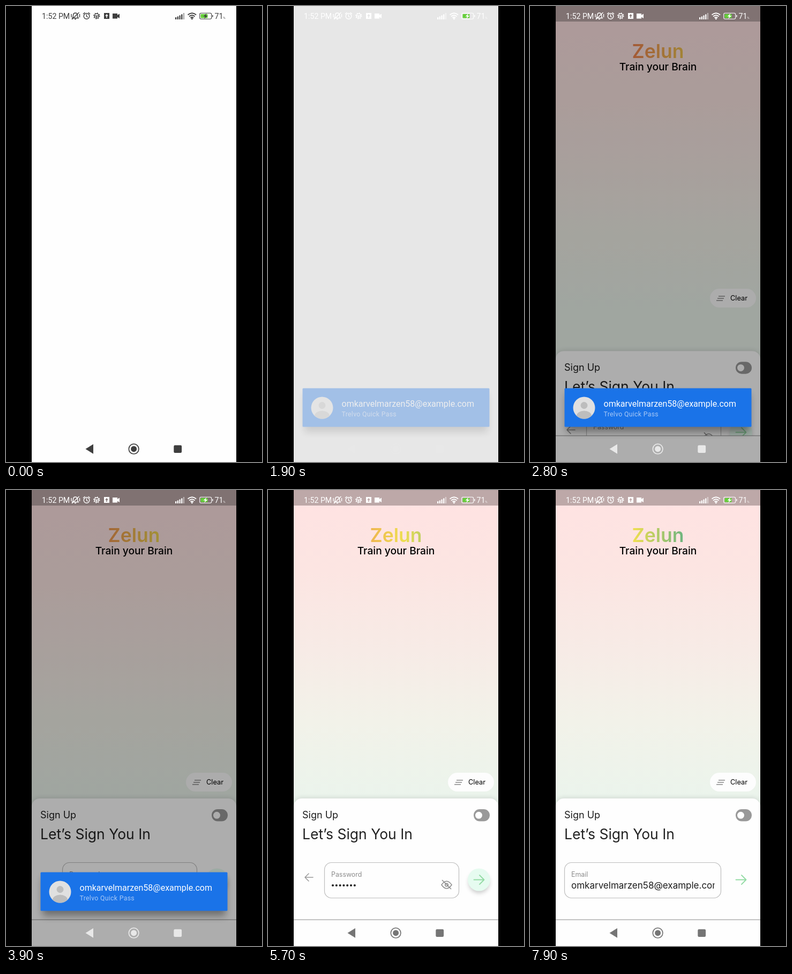
Animation of 478x850 px, one loop 8 s. Source, as an HTML page:

```html
<!DOCTYPE html>
<html lang="en">
<head>
<meta charset="utf-8">
<title>Sign in</title>
<style>
html, body { margin: 0; width: 100%; height: 100%; overflow: hidden; background: #000; }
svg { display: block; width: 100vw; height: 100vh; }
text { font-family: Inter, sans-serif; }
.sys { font-family: Roboto, sans-serif; }
.line { fill: none; stroke: currentColor; }
.round { stroke-linecap: round; stroke-linejoin: round; }
</style>
</head>
<body>
<svg viewBox="0 0 478 850">
  <defs>
    <linearGradient id="sky" gradientUnits="userSpaceOnUse" x1="0" y1="0" x2="0" y2="575">
      <stop offset="0" stop-color="#ffe2e2"/>
      <stop offset=".26" stop-color="#fce5e2"/>
      <stop offset=".52" stop-color="#f7ebe6"/>
      <stop offset=".75" stop-color="#f2f2e9"/>
      <stop offset="1" stop-color="#ebf4ec"/>
    </linearGradient>
    <linearGradient id="shimmer" gradientUnits="userSpaceOnUse" x1="0" x2="400" y1="0" y2="0">
      <stop offset="0" stop-color="#f16b50"/>
      <stop offset=".45" stop-color="#eede50"/>
      <stop offset=".725" stop-color="#55ad88"/>
      <stop offset="1" stop-color="#4a90d9"/>
    </linearGradient>
    <filter id="blur" x="-20%" y="-60%" width="140%" height="220%"><feGaussianBlur stdDeviation="7"/></filter>
    <filter id="soft" x="-50%" y="-50%" width="200%" height="200%"><feGaussianBlur stdDeviation="4"/></filter>
    <clipPath id="screen"><rect x="48" width="382" height="850"/></clipPath>
    <clipPath id="avatar"><circle cx="101" cy="749" r="20.5"/></clipPath>
    <clipPath id="entry"><rect x="70" y="722" width="275" height="34"/></clipPath>
  </defs>

  <rect width="478" height="850"/>
  <g clip-path="url(#screen)">
    <rect x="48" width="382" height="850" fill="#fefefe"/>

    <g id="page">
      <rect x="48" width="382" height="801" fill="url(#sky)"/>
      <rect x="48" width="382" height="29" opacity=".26"/>
      <text x="239" y="97" font-size="35.5" font-weight="600" text-anchor="middle" fill="url(#shimmer)">Zelun</text>
      <text x="239" y="120" font-size="19.2" font-weight="500" text-anchor="middle">Train your Brain</text>

      <rect x="336" y="527" width="86" height="35" rx="17.5" fill="#fdfdfd"/>
      <path class="line" color="#888" stroke-width="1.6" d="M352 541h12M350 545h12M348 549h12"/>
      <text x="374" y="549" font-size="12.8">Clear</text>

      <g id="sheet">
        <rect x="48" y="573" width="382" height="60" rx="15" opacity=".1" filter="url(#soft)"/>
        <rect x="48" y="575" width="382" height="290" rx="15" fill="#fefefe"/>
        <text x="64" y="611.5" font-size="18" fill="#1c1c1c">Sign Up</text>
        <text x="64" y="651" font-size="26.5" fill="#222">Let’s Sign You In</text>
        <rect x="384" y="595" width="30" height="22.5" rx="11.2" fill="#999"/>
        <circle cx="393.5" cy="606.3" r="6.5" fill="#fff"/>

        <rect id="field" y="694.5" height="66" rx="13" fill="none" stroke="#bcbcbc" stroke-width="1.2"/>
        <g id="secret">
          <path class="line round" color="#999" stroke-width="1.5" d="M84 722H69m7-7l-7 7l7 7"/>
          <text x="118" y="720.5" font-size="12.4" fill="#8c8c8c">Password</text>
          <path class="line round" color="#222" stroke-width="4.2" stroke-dasharray="0 6.8" d="M121 737h42"/>
          <path class="line" color="#8c8c8c" stroke-width="1.5" d="M324 736q9.500-13.500 19 0q-9.500 13.500-19 0zM325 727l17 17"/>
          <circle class="line" color="#8c8c8c" stroke-width="1.5" cx="333.500" cy="736" r="2.800"/>
          <circle cx="394" cy="732" r="19" opacity=".22" filter="url(#soft)"/>
          <circle cx="394" cy="726.500" r="21" fill="#e6fbf0"/>
        </g>
        <g id="mail">
          <text x="77" y="720.5" font-size="12.4" fill="#8c8c8c">Email</text>
          <text x="77" y="743" font-size="17" fill="#1c1c1c" clip-path="url(#entry)">omkarvelmarzen58@example.com</text>
        </g>
        <path class="line round" color="#93dba4" stroke-width="1.8" d="M384.500 726.500h19m-8.500-8.500l8.500 8.500l-8.500 8.500"/>
      </g>
      <rect x="48" y="801" width="382" height="49" fill="#fefefe"/>
      <rect x="48" y="800.500" width="382" height="1" fill="#8a8a8a"/>
    </g>

    <rect id="dim" x="48" width="382" height="850"/>

    <g id="dialog">
      <rect x="68" y="724" width="342" height="70" opacity=".36" filter="url(#blur)"/>
      <rect x="64.500" y="712.500" width="349" height="72" rx="1.500" fill="#1a73e8"/>
      <g clip-path="url(#avatar)">
        <rect x="80" y="728" width="42" height="42" fill="#e0e0e0"/>
        <g fill="#bdbdbd"><circle cx="101" cy="744.500" r="6.500"/><ellipse cx="101" cy="764" rx="14" ry="9.500"/></g>
      </g>
      <text class="sys" x="137.500" y="747" font-size="16" fill="#fff">omkarvelmarzen58@example.com</text>
      <text class="sys" x="137.500" y="765" font-size="12.300" letter-spacing=".3" fill="#a9c9f6">Trelvo Quick Pass</text>
    </g>

    <g id="status" fill="currentColor">
      <text class="sys" x="67" y="24" font-size="14.200">1:52 PM</text>
      <g class="line" stroke-width="1.400">
        <path d="M124 22.500h11q-1.500-1.500-1.500-5q0-4.500-4-4.500t-4 4.500q0 3.500-1.500 5zM128 24.500h3M123 25l13.500-13M122 15v6M137.500 15v6"/>
        <circle cx="150.500" cy="19" r="5.300"/>
        <path d="M150.500 15.500v4l2.500 1.500M144 15l3.500-3M157 15l-3.500-3"/>
        <circle cx="169.300" cy="18.500" r="4.300"/>
        <circle cx="169.300" cy="18.500" r="5.600" stroke-dasharray="1.600 2.800"/>
        <path d="M166 18.500h7M169.300 18.500v4"/>
      </g>
      <path fill-rule="evenodd" d="M183 13h10v11h-10zM188 15l-3 3.500h2.200v3.500h1.600v-3.500h2.200z"/>
      <path d="M199 14h9v3l4-2.500v8.500l-4-2.500v3h-9z"/>
      <path d="M316 21h2.300v4h-2.300zM319.700 19.500h2.300v5.500h-2.300zM323.400 17.500h2.300v7.500h-2.300zM327.100 15.500h2.300v9.500h-2.300z"/>
      <path opacity=".45" d="M330.800 13h2.300v12h-2.300z"/>
      <path class="line" stroke-width="1.900" d="M339.500 16.500q7.800-6.500 15.600 0M342 19.500q5.300-4.500 10.600 0M344.500 22.200q2.800-2.200 5.600 0"/>
      <circle cx="347.300" cy="23.800" r="1.500"/>
      <rect class="line" x="361.700" y="13.200" width="22" height="11" rx="2.500" stroke-width="1.100"/>
      <rect x="363.500" y="15" width="13" height="7.400" rx="1" fill="#65cf3a"/>
      <path d="M385 17h1.500v3.500h-1.500zM374.500 13.500l-6 6h3.500l-2 4.500l6.500-6h-3.700z"/>
      <text class="sys" x="389.500" y="24" font-size="14.200">71</text>
      <text class="sys" x="405.300" y="23.500" font-size="6">%</text>
    </g>

    <g id="nav" fill="currentColor">
      <path d="M148.500 825.700L163 816.700V834.700z"/>
      <circle class="line" cx="238.600" cy="825.700" r="9.300" stroke-width="1.700"/>
      <circle cx="238.600" cy="825.700" r="5.500"/>
      <rect x="313.300" y="818.700" width="14.800" height="14.300" rx="2.200"/>
    </g>
  </g>
</svg>
<script>
const LOOP = 8000, STEP = 100;
const $ = id => document.getElementById(id);
const ramp = (t, from, to) => Math.min(1, Math.max(0, (t - from) / (to - from)));
const ease = p => 1 - (1 - p) ** 3;
const gray = v => `rgb(${v},${v},${v})`;
const opacity = (id, v) => $(id).setAttribute("opacity", v);

function draw(t) {
  opacity("page", ramp(t, 2300, 2600));
  $("sheet").setAttribute("transform", `translate(0 ${230 * (1 - ease(ramp(t, 2600, 3200)))})`);

  opacity("dim", 0.32 * (ramp(t, 1850, 2030) - ramp(t, 4800, 5100)));
  opacity("dialog", ramp(t, 1850, 2000) - ramp(t, 4750, 4900));

  // password step slides back to the email step
  const back = ease(ramp(t, 6400, 6900));
  const left = 105.5 - 41 * back;
  $("field").setAttribute("x", left);
  $("field").setAttribute("width", 356.5 - left);
  opacity("secret", 1 - ramp(back, 0, 0.6));
  opacity("mail", ramp(back, 0.5, 1));

  // the title colours drift to the left
  const drift = 14 + (7900 - t) * 0.027;
  $("shimmer").setAttribute("gradientTransform", `translate(${drift})`);

  $("status").style.color = t < 1900 ? gray(62) : "#fff";
  const covered = t >= 1900 && t < 4850;
  $("nav").style.color = covered ? gray(232) : gray(62 + 55 * ramp(t, 400, 800));
}

function tick(now) {
  draw(Math.floor((now % LOOP) / STEP) * STEP);
  requestAnimationFrame(tick);
}
draw(0);
requestAnimationFrame(tick);
</script>
</body>
</html>
```
